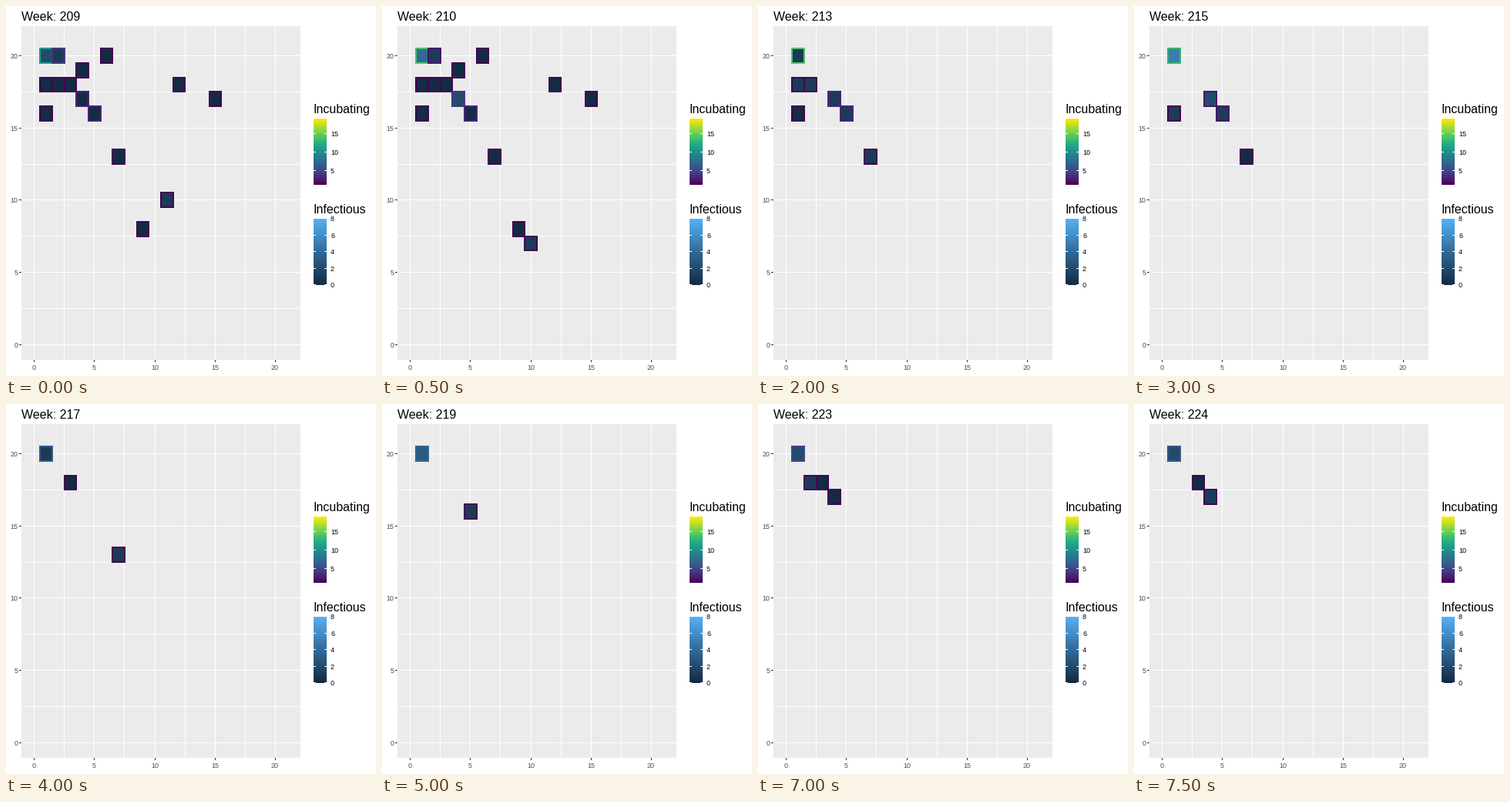
Recreate the animation shown at these times as a matplotlib script. Size 480x480 px, loop 8 s.

```python
import numpy as np
import matplotlib.pyplot as plt
from matplotlib.animation import FuncAnimation
from matplotlib.colors import LinearSegmentedColormap
from matplotlib.patches import Rectangle

SIZE, DPI = 480, 96
LEFT, TOP, RIGHT, BOTTOM = 20, 26, 382, 459
LOW, SPAN = -1.05, 23.1
FRAMES, FIRST_WEEK = 16, 209

viridis = plt.get_cmap("viridis")
blues = LinearSegmentedColormap.from_list("blues", ["#132B43", "#326A97", "#56B1F7"])

# Main outbreak at (1, 20)
CORE_SICK = [2, 4, 7, 5, 1, 3, 5, 3, 1, 2, 3, 3]  # then steady at 2
CORE_EDGE = [11, 14, 17, 16, 14, 14, 13, 6, 6, 8, 7]  # then steady at 5
SIDE_SICK = [0, 2, 4, 3, 1, 2, 2, 1]

# Single cases by (first, last) step; they turn infectious in the last one
CASES = {
    (0, 0): [(11, 10)],
    (0, 2): [(6, 20), (4, 19), (12, 18), (15, 17), (9, 8)],
    (0, 3): [(3, 18)],
    (0, 4): [(1, 18), (2, 18), (7, 13)],
    (0, 6): [(1, 16)],
    (1, 1): [(10, 7)],
    (3, 3): [(11, 12)],
    (5, 8): [(7, 13)],
    (8, 9): [(3, 18)],
    (10, 10): [(5, 16)],
    (12, 13): [(5, 16)],
    (13, 14): [(2, 18)],
    (14, 15): [(4, 17)],
    (14, 16): [(3, 18)],
}

fig = plt.figure(figsize=(SIZE / DPI, SIZE / DPI), dpi=DPI, facecolor="white")
ax = fig.add_axes([0, 0, 1, 1])


def px(x):
    return LEFT + (x - LOW) * (RIGHT - LEFT) / SPAN


def py(y):
    return BOTTOM - (y - LOW) * (BOTTOM - TOP) / SPAN


def box(x0, y0, x1, y1, color, z=1):
    return ax.add_patch(Rectangle((x0, y0), x1 - x0, y1 - y0, facecolor=color,
                                  linewidth=0, antialiased=False, zorder=z))


def label(x, y, text, size, color="black", ha="left"):
    return ax.text(x, y, text, fontsize=size * 72 / DPI, color=color, ha=ha,
                   va="baseline", family="Liberation Sans", zorder=5)


def draw_panel():
    box(LEFT, TOP, RIGHT, BOTTOM, "#EBEBEB")
    for v in np.arange(0, 20.1, 2.5):
        gx, gy = int(px(v)), int(py(v))
        box(gx, TOP, gx + 1, BOTTOM, "white", 2)
        box(LEFT, gy, RIGHT, gy + 1, "white", 2)
        if v % 5 == 0:
            box(gx, BOTTOM, gx + 1, BOTTOM + 3, "#333333")
            box(LEFT - 3, gy, LEFT, gy + 1, "#333333")
            label(gx, 472.5, f"{v:.0f}", 9, "#4D4D4D", "center")
            label(15.5, gy + 4.3, f"{v:.0f}", 9, "#4D4D4D", "right")


def draw_legend(title, top, cmap, ticks):
    label(398, top - 7, title, 16)
    ramp = np.linspace(1, 0, 86)[:, None]
    ax.imshow(ramp, cmap=cmap, extent=(399, 416, top + 86, top),
              aspect="auto", interpolation="nearest", zorder=2)
    for value, y in ticks:
        box(399, y, 402, y + 1, "white", 3)
        box(413, y, 416, y + 1, "white", 3)
        label(421, y + 4, str(value), 9)


def draw_tile(x, y, sick, edge):
    x0, x1 = round(px(x - 0.5)), round(px(x + 0.5))
    y0, y1 = round(py(y + 0.5)), round(py(y - 0.5))
    return [box(x0 - 1, y0 - 1, x1 + 1, y1 + 1, viridis((edge - 1) / 18), 4),
            box(x0 + 1, y0 + 1, x1 - 1, y1 - 1, blues(sick / 8), 4)]


def at(values, step, rest):
    return values[step] if step < len(values) else rest


def cells(step):
    """Yield x, y, infectious, incubating for every occupied cell."""
    yield 1, 20, at(CORE_SICK, step, 2), at(CORE_EDGE, step, 6 if step == 15 else 5)
    if step < 3:
        yield 2, 20, 1, (4, 2, 1)[step]
    if step < 8:
        yield 4, 17, SIDE_SICK[step], max(2, 5 - abs(step - 2)) + (step == 5)
        yield 5, 16, int(step > 3), 3 if step in (0, 1, 4) else 2
    if step in (5, 7, 9):
        yield 8, 12, 0, 1
    for (first, last), places in CASES.items():
        if first <= step <= last:
            for x, y in places:
                yield x, y, int(step == last), 1


draw_panel()
draw_legend("Incubating", 146, viridis, [(v, 237 - 24 * v // 5) for v in (5, 10, 15)])
draw_legend("Infectious", 276, blues, [(v, int(361.5 - 10.7 * v)) for v in range(0, 9, 2)])
title = label(20, 19, "", 16)
ax.set(xlim=(0, SIZE), ylim=(SIZE, 0))
ax.axis("off")
tiles = []


def update(step):
    while tiles:
        tiles.pop().remove()
    title.set_text(f"Week: {FIRST_WEEK + step}")
    for cell in sorted(cells(step)):
        tiles.extend(draw_tile(*cell))
    return [title, *tiles]


anim = FuncAnimation(fig, update, frames=FRAMES, init_func=lambda: [],
                     interval=500, repeat=True, repeat_delay=0, blit=False)
plt.show()
```
